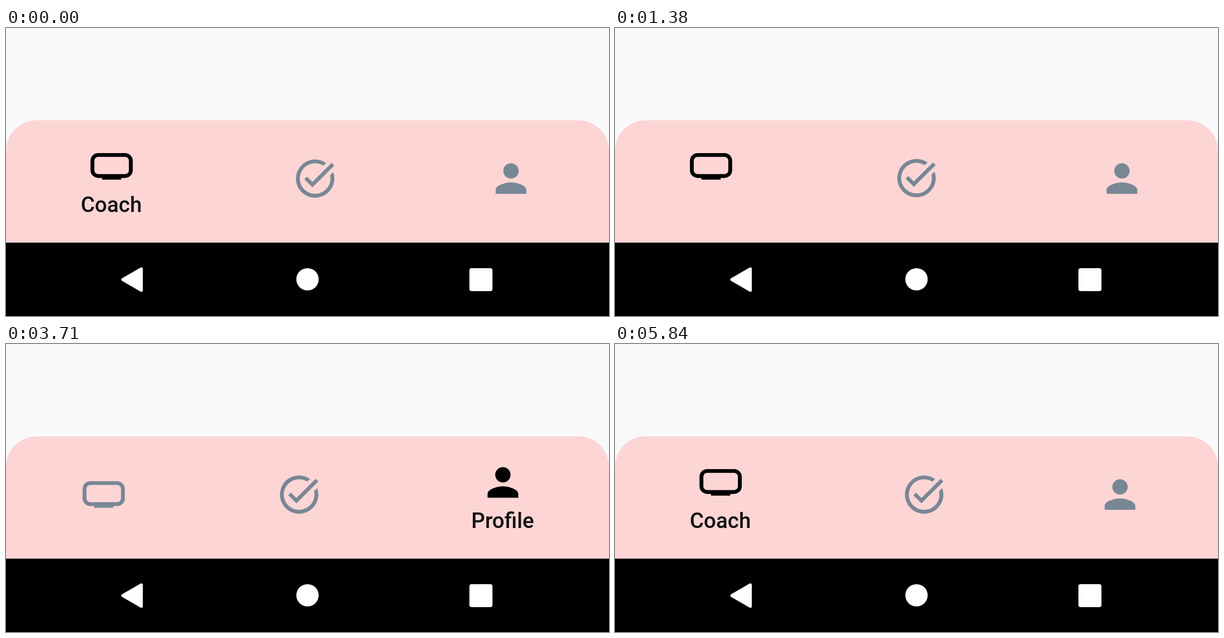
Write an HTML page that moves like this. It is 1080 px wide and 518 px high and loops after 5920 ms.

```html
<!DOCTYPE html>
<html lang="en">
<head>
<meta charset="utf-8">
<title>Bottom navigation</title>
<style>
  html, body { margin: 0; width: 100%; height: 100%; overflow: hidden; background: #f9f9fb; }
  svg { display: block; width: 100%; height: 100%; }
  text { font: 500 38.5px Roboto, sans-serif; text-anchor: middle; fill: #111; }
</style>
</head>
<body>
<svg viewBox="0 0 1080 518">
  <rect width="1080" height="518" fill="#f9f9fb"/>
  <path d="M0 387V221A55 55 0 0 1 55 166H1025A55 55 0 0 1 1080 221V387Z" fill="#fdd5d5"/>

  <g class="tab">
    <g class="icon">
      <rect x="2" y="6" width="20" height="11" rx="3" fill="none" stroke="currentColor" stroke-width="2"/>
      <rect x="7" y="17" width="10" height="1.9" fill="currentColor"/>
    </g>
    <text y="331">Coach</text>
  </g>
  <g class="tab">
    <g class="icon">
      <path fill="currentColor" d="M22 5.18 10.59 16.6 6.35 12.36 7.76 10.95 10.59 13.78 20.59 3.78ZM19.79 10.22C19.92 10.79 20 11.39 20 12c0 4.42-3.58 8-8 8s-8-3.58-8-8 3.58-8 8-8c1.58 0 3.04.46 4.28 1.25l1.44-1.44C16.1 2.67 14.13 2 12 2 6.48 2 2 6.48 2 12s4.48 10 10 10 10-4.48 10-10c0-1.19-.22-2.33-.6-3.39Z"/>
    </g>
    <text y="331">Actions</text>
  </g>
  <g class="tab">
    <g class="icon">
      <path fill="currentColor" d="M12 12c2.21 0 4-1.79 4-4s-1.79-4-4-4-4 1.79-4 4 1.79 4 4 4ZM12 14c-2.67 0-8 1.34-8 4v2h16v-2c0-2.66-5.33-4-8-4Z"/>
    </g>
    <text y="331">Profile</text>
  </g>

  <rect y="386" width="1080" height="132"/>
  <g fill="#fff">
    <path d="M209 452.5 242.5 433V472Z" stroke="#fff" stroke-width="5" stroke-linejoin="round"/>
    <circle cx="540" cy="452" r="20"/>
    <rect x="830" y="432" width="41.3" height="41.3" rx="4"/>
  </g>
</svg>
<script>
const LOOP = 5920, FADE = 750, MOVE = 300, SCALE = 82.5 / 24;
const LOW = 270.8, HIGH = 249;
const IDLE = [120, 135, 148];

// Tab centres for each active tab
const CENTERS = [[189.2, 553.7, 904.5], [172, 540, 908], [175, 525, 890]];
const TAPS = [
  { at: -LOOP, from: 2, to: 0 },
  { at: 1375, from: 0, to: 1 },
  { at: 2820, from: 1, to: 2 },
  { at: 4345, from: 2, to: 0 }
];

const tabs = [...document.querySelectorAll('.tab')].map(tab => ({
  icon: tab.querySelector('.icon'),
  label: tab.querySelector('text')
}));

const clamp = v => Math.min(1, Math.max(0, v));
const easeInOut = u => (1 - Math.cos(Math.PI * clamp(u))) / 2;
const easeOut = u => 1 - (1 - clamp(u)) ** 2;

function render(time) {
  const tap = TAPS.findLast(s => time >= s.at);
  const age = time - tap.at;
  const fade = easeInOut(age / FADE);
  tabs.forEach(({ icon, label }, i) => {
    const x = CENTERS[tap.to][i];
    let lift = 0, dark = 0;
    if (i === tap.to) {
      lift = easeOut(age / MOVE);
      dark = fade;
    } else if (i === tap.from) {
      // The old icon drops only after the new one has risen
      lift = 1 - easeOut((age - MOVE) / MOVE);
      dark = 1 - fade;
    }
    const y = LOW + (HIGH - LOW) * lift;
    icon.setAttribute('transform', `translate(${x} ${y}) scale(${SCALE}) translate(-12 -12)`);
    icon.style.color = `rgb(${IDLE.map(c => Math.round(c * (1 - dark)))})`;
    label.setAttribute('x', x - .5);
    label.setAttribute('opacity', i === tap.to ? fade : 0);
  });
}

function tick() {
  render(performance.now() % LOOP);
  requestAnimationFrame(tick);
}
tick();
</script>
</body>
</html>
```
